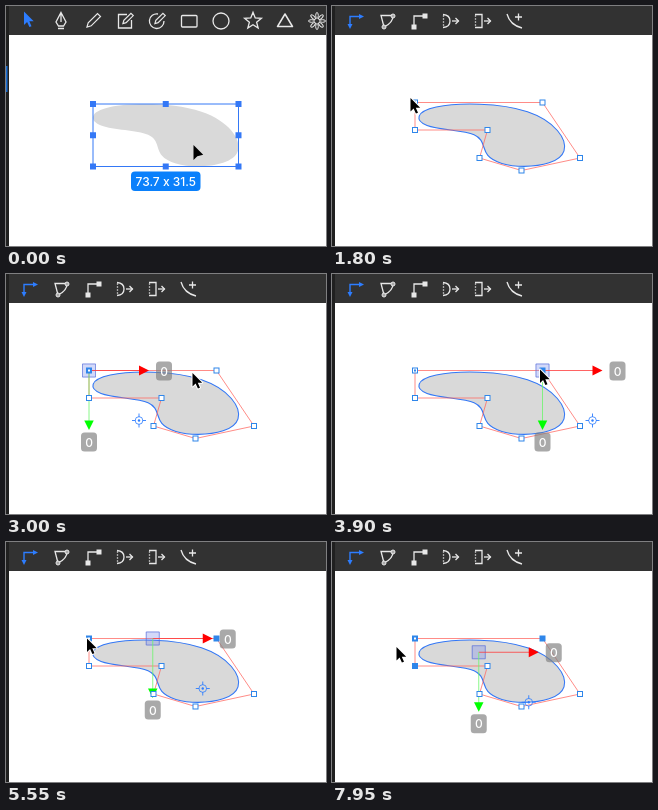
Animation, 320 px wide and 240 px high, one loop 8 s. Source, as an HTML page with a canvas:

```html
<!DOCTYPE html>
<html lang="en">
<head>
<meta charset="utf-8">
<title>Editing spline nodes</title>
<style>
html, body { margin: 0; width: 100%; height: 100%; overflow: hidden; background: #fff; }
canvas { display: block; width: 320px; height: 240px; }
</style>
</head>
<body>
<canvas id="stage"></canvas>
<script>
const canvas = document.getElementById('stage');
const ctx = canvas.getContext('2d');
const dpr = window.devicePixelRatio || 1;
canvas.width = 320 * dpr;
canvas.height = 240 * dpr;

const LOOP = 8000, STEP = 150, EDIT_START = 300;
const BLUE = '#3478f6', NODE = '#2f86ea', ICON = '#e8e8e8', ACTIVE = '#2d7dff';
const nodes = [[83, 96.5], [210.5, 96.5], [248, 152], [189.5, 164.5], [147.5, 152], [155.5, 124], [83, 124]];

// Clicks: time and the nodes selected from then on
const clicks = [[0, []], [2550, [0]], [3900, [1]], [5550, [0, 1]], [7050, [0, 1, 6]]];

// Pointer moves: start, duration, destination
const home = [187.5, 139];
const moves = [
  [1200, 600, [78.5, 92]], [1800, 150, [60.5, 76.5]], [1950, 300, [82, 96]],
  [2550, 450, [186.5, 99]], [3000, 600, [208, 95.5]],
  [3900, 750, [99.5, 101]], [4650, 600, [81, 96.5]],
  [6000, 450, [82.5, 124.5]], [7650, 300, [64.5, 105]]
];

const mix = (a, b, k) => a.map((v, i) => v + (b[i] - v) * k);
const easeOut = k => 1 - (1 - k) ** 2;
const polar = (r, a) => [r * Math.cos(a), r * Math.sin(a)];

function pointerAt(t) {
  return moves.reduce((at, [start, time, to]) => {
    const k = Math.min(1, Math.max(0, (t - start) / time));
    return mix(at, to, easeOut(k));
  }, home);
}

function poly(points, closed = true) {
  ctx.beginPath();
  points.forEach(p => ctx.lineTo(...p));
  if (closed) ctx.closePath();
}
function fill(color) { ctx.fillStyle = color; ctx.fill(); }
function stroke(color, width = 1) {
  ctx.strokeStyle = color;
  ctx.lineWidth = width;
  ctx.stroke();
}
function line(color, width, ...points) { poly(points, false); stroke(color, width); }
function rect(x, y, w, h, color) { ctx.fillStyle = color; ctx.fillRect(x, y, w, h); }
function square(x, y, size, color) { rect(x - size / 2, y - size / 2, size, size, color); }
function disc(x, y, r) { ctx.beginPath(); ctx.arc(x, y, r, 0, Math.PI * 2); }
function svg(d, color = ICON, width = 1.3) {
  ctx.strokeStyle = color;
  ctx.lineWidth = width;
  ctx.stroke(new Path2D(d));
}
function pill(x, y, w, h, r, color) {
  ctx.beginPath();
  ctx.roundRect(x, y, w, h, r);
  fill(color);
}
function text(s, x, y) {
  ctx.font = '500 12px Inter, sans-serif';
  ctx.fillStyle = '#fff';
  ctx.textAlign = 'center';
  ctx.fillText(s, x, y);
}
function placed(x, y, angle, draw) {
  ctx.save();
  ctx.translate(x, y);
  ctx.rotate(angle);
  draw();
  ctx.restore();
}
// Arrowhead with its base at x, y
function head(x, y, angle, size, color) {
  placed(x, y, angle, () => {
    poly([[0, -size / 2], [size, 0], [0, size / 2]]);
    fill(color);
  });
}

// Closed uniform cubic B-spline through the control polygon
function blob() {
  const at = i => nodes[i % nodes.length];
  const knot = i => mix(mix(at(i + 6), at(i), 2 / 3), mix(at(i), at(i + 1), 1 / 3), .5);
  ctx.beginPath();
  ctx.moveTo(...knot(0));
  nodes.forEach((a, i) => {
    const b = at(i + 1);
    ctx.bezierCurveTo(...mix(a, b, 1 / 3), ...mix(a, b, 2 / 3), ...knot(i + 1));
  });
  ctx.closePath();
  fill('#d9d9d9');
}

// Icons are drawn around their own centre
function pencil(size) {
  placed(0, 0, -Math.PI / 4, () => {
    const w = size / 4, n = -size * .55;
    poly([[-size, 0], [n, -w], [size, -w], [size, w], [n, w]]);
    stroke(ICON, 1.2);
  });
}
function star() {
  poly(Array.from({ length: 10 }, (_, i) => polar(i % 2 ? 3.8 : 8.8, (i - 2.5) * Math.PI / 5)));
  stroke(ICON, 1.3);
}
function burst() {
  for (let i = 0; i < 8; i++) placed(0, 0, i * Math.PI / 4, () => {
    ctx.beginPath();
    ctx.ellipse(5.5, 0, 3, 1.3, 0, 0, Math.PI * 2);
    stroke(ICON, 1);
  });
}
function arrowCursor() {
  placed(-5, -9.5, 0, () => {
    poly(arrow(true));
    fill(ACTIVE);
  });
}
function outward(edge) {
  svg(edge);
  for (let y = -5; y < 6; y += 3) square(-7.5, y, 1.3, ICON);
  line(ICON, 1.3, [1, 0], [7.5, 0]);
  line(ICON, 1.3, [4.5, -3], [7.5, 0], [4.5, 3]);
}

const tools = [
  arrowCursor,
  () => svg('M0 -8.5L5 1L2.5 5H-2.5L-5 1Z M0 -8V1 M-3 7.5H3'),
  () => pencil(8.5),
  () => { svg('M2 -6.5H-6.5V7H6.5V-1'); placed(2.5, -2, 0, () => pencil(6.5)); },
  () => { svg('M1 -7A7.3 7.3 0 1 0 7 0'); placed(2.5, -2, 0, () => pencil(6.5)); },
  () => { ctx.beginPath(); ctx.roundRect(-7.5, -5.5, 15.5, 11.5, 1); stroke(ICON, 1.3); },
  () => { disc(0, 0, 8); stroke(ICON, 1.3); },
  star,
  () => { ctx.lineJoin = 'round'; svg('M0 -7L7.5 5.5H-7.5Z', ICON, 1.5); },
  burst
];

const editTools = [
  () => {
    svg('M-5 3V-4.5H4', ACTIVE, 1.4);
    head(4, -4.5, 0, 5, ACTIVE);
    head(-5, 3, Math.PI / 2, 5, ACTIVE);
  },
  () => {
    svg('M-3 6L-6 -5.5H6Q6 2 -3 6');
    for (const [x, y] of [[6, -5], [-3, 6]]) {
      disc(x, y, 2);
      fill('#aaa');
      stroke(ICON);
    }
  },
  () => {
    svg('M-5 6V-5H6');
    square(-5, 6, 5, ICON);
    square(6, -5, 5, ICON);
  },
  () => outward('M-8 -6.5Q-1 -6 -1 0Q-1 6 -8 6.5'),
  () => outward('M-8 -6.5H-1V6.5H-8'),
  () => svg('M-8 -7Q-5 4 7 7 M3.5 -7.5V-.5 M0 -4H7')
];

function drawFrame(edit) {
  rect(0, 0, 320, 240, '#fff');
  rect(0, 0, 320, 29, '#323232');
  rect(0, 0, 3, 240, '#202020');
  if (!edit) rect(0, 60, 1.5, 26, '#1b6fd6');
  (edit ? editTools : tools).forEach((icon, i) => placed(23 + 32 * i, 15, 0, icon));
}

function drawBounds() {
  const x = 87, y = 98, w = 145.5, h = 62.5;
  ctx.beginPath();
  ctx.rect(x, y, w, h);
  stroke(BLUE);
  for (const i of [0, .5, 1])
    for (const j of [0, .5, 1])
      if (i !== .5 || j !== .5) square(x + w * i, y + h * j, 6, BLUE);
  pill(125, 165.5, 69.5, 19.5, 4, '#0a80fb');
  text('73.7 x 31.5', x + w / 2, 179.6);
}

function drawNode([x, y], first, picked) {
  square(x, y, 6, NODE);
  if (!picked) square(x, y, 4, '#fff');
  if (first) square(x, y, 2, picked ? '#fff' : NODE);
}

function middle(list) {
  return [0, 1].map(k => {
    const v = list.map(i => nodes[i][k]);
    return (Math.min(...v) + Math.max(...v)) / 2;
  });
}

function drawArms([x, y]) {
  square(x, y, 14, 'rgba(110,130,235,.3)');
  ctx.beginPath();
  ctx.rect(x - 6.5, y - 6.5, 13, 13);
  stroke('rgba(80,105,215,.6)');
  line('#ff3b3b', .8, [x, y], [x + 51, y]);
  line('#6cf56c', .8, [x, y], [x, y + 51]);
  head(x + 50, y, 0, 10, '#ff0000');
  head(x, y + 50, Math.PI / 2, 9.5, '#00ff00');
}

function drawTarget(x, y) {
  placed(x, y, 0, () => {
    disc(0, 0, 3.8);
    stroke(ACTIVE, .8);
    disc(0, 0, 1.2);
    fill(ACTIVE);
    for (let a = 0; a < 6; a += Math.PI / 2) line(ACTIVE, .9, polar(3.5, a), polar(7, a));
  });
}

function badge(x, y) {
  pill(x - 8, y - 9.5, 16, 19, 3.5, 'rgba(128,128,128,.68)');
  text('0', x, y + 4.5);
}

function drawEditor(picked) {
  stroke(BLUE, 1.1);
  poly(nodes);
  stroke('#ff665f', .75);
  const c = picked.length ? middle(picked) : null;
  if (c) drawArms(c);
  nodes.forEach((p, i) => drawNode(p, i === 0, picked.includes(i)));
  if (!c) return;
  drawTarget(c[0] + 50, c[1] + 50);
  badge(c[0] + 75, c[1] + .5);
  badge(c[0], c[1] + 71.5);
}

function arrow(tail) {
  const shaft = tail ? [[3.1, 10.6], [5.4, 15.6], [7.5, 14.7], [5.3, 9.8]] : [[3.8, 11.2]];
  return [[0, 0], [0, tail ? 13.5 : 15], ...shaft, [9.7, 9.8]];
}

function drawPointer([x, y], edit) {
  placed(x, y, 0, () => {
    ctx.lineJoin = 'round';
    poly(arrow(edit));
    if (edit) stroke('#fff', 2);
    fill('#000');
  });
}

function draw(now) {
  const t = Math.floor(now % LOOP / STEP) * STEP;
  const edit = t >= EDIT_START;
  ctx.setTransform(dpr, 0, 0, dpr, 0, 0);
  drawFrame(edit);
  blob();
  if (edit) drawEditor(clicks.filter(c => c[0] <= t).pop()[1]);
  else drawBounds();
  drawPointer(pointerAt(t), edit);
}

const start = performance.now();
function tick() {
  draw(performance.now() - start);
  requestAnimationFrame(tick);
}
tick();
</script>
</body>
</html>
```
